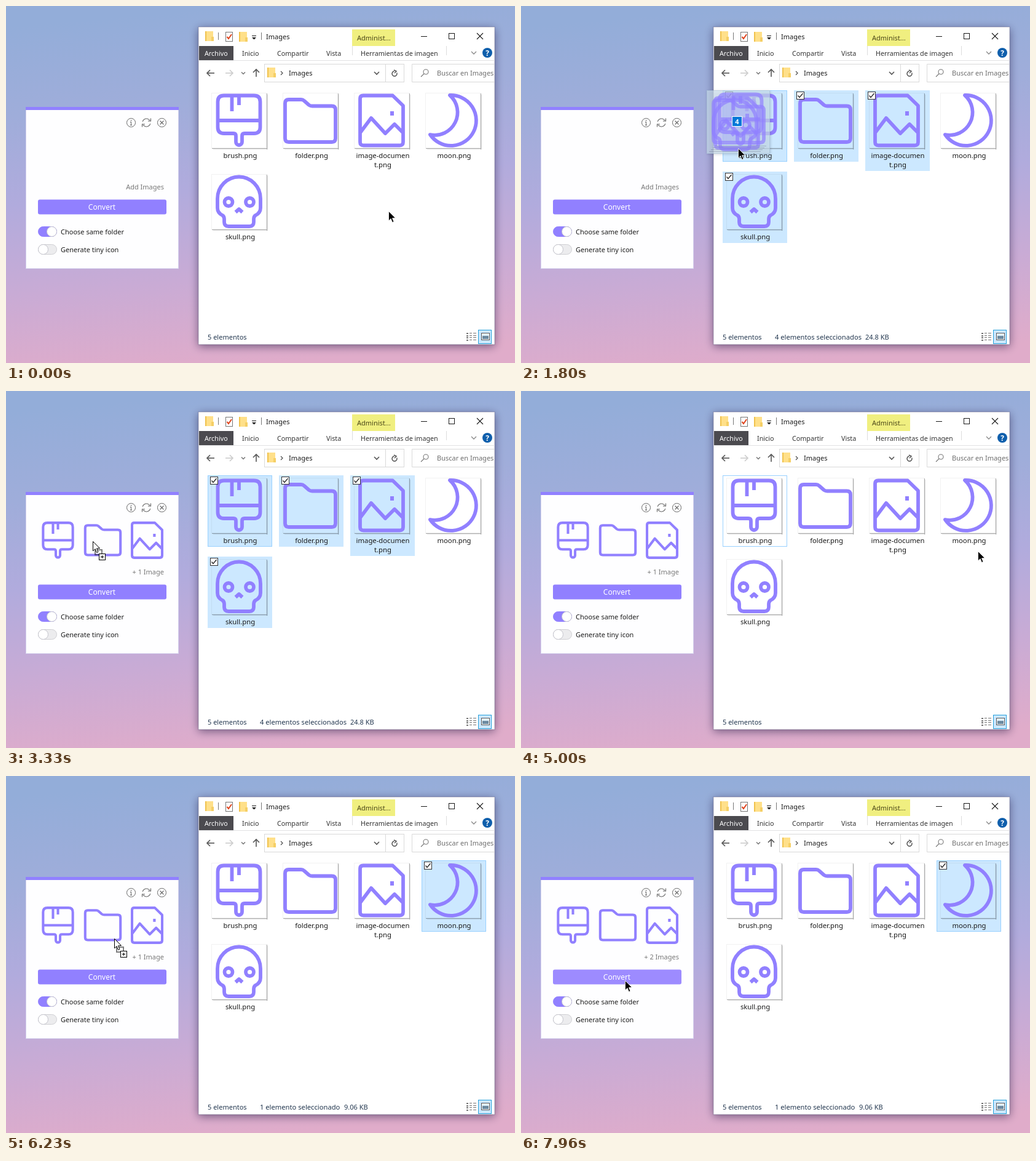
An HTML page with a canvas for the animation above (8000 ms loop, 828 px wide and 580 px high).

```html
<!DOCTYPE html>
<html lang="es">
<head>
<meta charset="utf-8">
<title>Drag and convert</title>
<style>
html, body { margin: 0; width: 100%; height: 100%; overflow: hidden; }
canvas { display: block; }
</style>
</head>
<body>
<canvas id="stage" width="828" height="580"></canvas>
<script>
const ctx = document.getElementById('stage').getContext('2d');
const LOOP = 8000;
const PURPLE = '#9180ff', PALE = '#cce8ff', EDGE = '#99d1ff', INK = '#1b1b1b';
const FONT = '"Noto Sans", "Open Sans", sans-serif';
const START = { x: 622, y: 333 };
const PANEL_RIGHT = 281;

// Pointer keys: time, x, y
const KEYS = [
  [0, 622, 333], [500, 622, 333], [830, 428, 230], [1060, 400, 212],
  [1230, 400, 212], [1360, 399, 217], [1600, 399, 217], [1800, 353, 231],
  [2100, 230, 245], [2430, 122, 246], [2550, 117, 237], [2700, 140, 227],
  [2860, 175, 245], [2980, 165, 261], [3100, 141, 244], [3670, 141, 244],
  [4160, 545, 326], [4770, 545, 326], [5000, 743, 260], [5200, 757, 205],
  [5370, 757, 205], [6200, 183, 264], [6230, 176, 264], [6830, 176, 264],
  [7250, 158, 304], [7660, 132, 339], [7960, 169, 332], [8000, 169, 332]
];

// Icon outlines on a 90 x 90 tile
const ICONS = {
  brush: 'M20.5 4.5H69.5Q79.5 4.5 79.5 14.5V56Q79.5 66 69.5 66H54Q50 66 50 70V80A5 5 0 0 1 40 80V70Q40 66 36 66H20.5Q10.5 66 10.5 56V14.5Q10.5 4.5 20.5 4.5ZM10.5 45H79.5M33.5 5V30M45 5V20',
  folder: 'M10 11H30Q33 11 35 13L43 20Q45 21.500 48 21.500H80Q86 21.500 86 27.500V74Q86 80 80 80H10Q4 80 4 74V17Q4 11 10 11Z',
  image: 'M15 4.5H63L80 21V80Q80 85.500 74.500 85.500H15.500Q10 85.500 10 80V9.500Q10 4.500 15 4.500ZM10 65L28 41L51 66L66 51L80 65',
  moon: 'M40 4A41 41 0 1 1 8 68A37 37 0 0 0 40 4Z',
  skull: 'M10 40A35 35.500 0 0 1 80 40V55Q80 63 72 67Q69 69 69 73V78Q69 85 62 85H28Q21 85 21 78V73Q21 69 18 67Q10 63 10 55ZM39.500 62L45 57L50.500 62M34.500 45.500A6.500 6.500 0 1 1 21.500 45.500A6.500 6.500 0 1 1 34.500 45.500M69 45.500A6.500 6.500 0 1 1 56 45.500A6.500 6.500 0 1 1 69 45.500'
};
for (const name in ICONS) ICONS[name] = new Path2D(ICONS[name]);

const FILES = [
  { icon: 'brush', label: ['brush.png'], x: 328, y: 137, h: 116 },
  { icon: 'folder', label: ['folder.png'], x: 444, y: 137, h: 116 },
  { icon: 'image', label: ['image-documen', 't.png'], x: 560, y: 137, h: 131 },
  { icon: 'moon', label: ['moon.png'], x: 676, y: 137, h: 116 },
  { icon: 'skull', label: ['skull.png'], x: 328, y: 269, h: 116 }
];
const CELL = 105;

function pointerAt(t) {
  let i = 0;
  while (i < KEYS.length - 2 && KEYS[i + 1][0] <= t) i++;
  const a = KEYS[i], b = KEYS[i + 1], span = b[0] - a[0], u = (t - a[0]) / span;
  const held = (p, q) => p[1] === q[1] && p[2] === q[2];
  const slope = (j, k) => {
    const p = KEYS[j - 1], c = KEYS[j], n = KEYS[j + 1];
    if (!p || !n || held(p, c) || held(c, n)) return 0;
    return (n[k] - p[k]) / (n[0] - p[0]);
  };
  const mix = k => {
    const u2 = u * u, u3 = u2 * u;
    return (2 * u3 - 3 * u2 + 1) * a[k] + (3 * u2 - 2 * u3) * b[k] +
      span * ((u3 - 2 * u2 + u) * slope(i, k) + (u3 - u2) * slope(i + 1, k));
  };
  return { x: Math.round(mix(1)), y: Math.round(mix(2)) };
}

function text(str, x, y, color = INK, size = 11, align = 'left', weight = '') {
  ctx.font = `${weight} ${size}px ${FONT}`;
  ctx.textAlign = align;
  ctx.fillStyle = color;
  ctx.fillText(str, x, y);
}

function rect(x, y, w, h, fill, edge) {
  if (fill) { ctx.fillStyle = fill; ctx.fillRect(x, y, w, h); }
  if (edge) { ctx.strokeStyle = edge; ctx.lineWidth = 1; ctx.strokeRect(x + .5, y + .5, w - 1, h - 1); }
}

function pill(x, y, w, h, r, fill, edge) {
  ctx.beginPath();
  ctx.roundRect(x, y, w, h, r);
  ctx.fillStyle = fill;
  ctx.fill();
  if (edge) { ctx.strokeStyle = edge; ctx.lineWidth = 1; ctx.stroke(); }
}

function line(color, width, ...pts) {
  ctx.beginPath();
  for (let i = 0; i < pts.length; i += 2) ctx.lineTo(pts[i], pts[i + 1]);
  ctx.strokeStyle = color;
  ctx.lineWidth = width;
  ctx.stroke();
}

function ring(x, y, r, color, width = 1, from = 0, to = Math.PI * 2) {
  ctx.beginPath();
  ctx.arc(x, y, r, from, to);
  ctx.strokeStyle = color;
  ctx.lineWidth = width;
  ctx.stroke();
}

function icon(name, x, y, scale = 1) {
  ctx.save();
  ctx.translate(x, y);
  ctx.scale(scale, scale);
  ctx.strokeStyle = ctx.fillStyle = PURPLE;
  ctx.lineWidth = 5.8;
  ctx.lineJoin = 'round';
  ctx.stroke(ICONS[name]);
  if (name === 'image') ctx.fillRect(59, 30, 6, 7);
  ctx.restore();
}

function backdrop() {
  const g = ctx.createLinearGradient(390, 0, 440, 580);
  ['#93add9', '#9fadda', '#b1abdd', '#c9abd5', '#e0acca'].forEach((c, i) => g.addColorStop(i / 4, c));
  ctx.fillStyle = g;
  ctx.fillRect(0, 0, 828, 580);
}

function folderGlyph(x, y) {
  rect(x, y, 13, 16, '#ffe08a');
  rect(x, y, 2, 16, '#f0c24e');
  rect(x + 10, y + 9, 4, 7, '#f5cf66');
}

function chevron(x, y, r, color, width = 1.3) {
  line(color, width, x - r, y - r / 2, x, y + r / 2, x + r, y - r / 2);
}

function arrow(x, y, dx, dy, color) {
  line(color, 1.6, x - dx * 6, y - dy * 6, x + dx * 6, y + dy * 6);
  line(color, 1.6, x + dx * 1 + dy * 5, y + dy * 1 + dx * 5, x + dx * 6, y + dy * 6,
    x + dx * 1 - dy * 5, y + dy * 1 - dx * 5);
}

function explorer() {
  ctx.save();
  ctx.shadowColor = 'rgba(30,20,60,.55)';
  ctx.shadowBlur = 14;
  ctx.shadowOffsetY = 3;
  rect(313, 34, 482, 516, '#fff');
  ctx.restore();
  rect(312.5, 33.5, 483, 517, null, 'rgba(90,85,120,.45)');

  folderGlyph(324, 41);
  rect(345, 43, 1, 12, '#777');
  rect(357, 42, 12, 16, '#fff', '#777');
  line('#e0451f', 2, 359.5, 50, 362, 53, 367, 46);
  folderGlyph(379, 42);
  rect(400, 48, 7, 1, INK);
  ctx.beginPath();
  ctx.moveTo(400, 51); ctx.lineTo(407, 51); ctx.lineTo(403.5, 54.5);
  ctx.fillStyle = INK;
  ctx.fill();
  rect(415, 43, 1, 12, '#777');
  text('Images', 423, 54);
  rect(563, 38, 70, 27, '#f0ef80');
  text('Administ...', 571, 56, '#4b4718');
  rect(675, 49, 10, 1, INK);
  rect(720, 44, 10, 10, null, INK);
  line(INK, 1.1, 766, 44, 776, 54);
  line(INK, 1.1, 776, 44, 766, 54);

  rect(314, 65, 56, 23, '#4b4a4f');
  [['Archivo', 323, '#fff'], ['Inicio', 384], ['Compartir', 441], ['Vista', 521],
    ['Herramientas de imagen', 577]].forEach(([s, x, c]) => text(s, x, 81, c || '#333', 10.75));
  rect(563, 65, 1, 15, '#ddd');
  rect(716, 65, 1, 15, '#ddd');
  rect(313, 88, 482, 1, '#e2e2e4');
  chevron(761, 76, 4, '#888');
  pill(775, 68, 16, 16, 8, '#0f5fac');
  text('?', 783, 80.5, '#fff', 12, 'center', 'bold');

  arrow(333, 109, -1, 0, '#555');
  arrow(363, 109, 1, 0, '#ccc');
  chevron(386, 109, 3, '#777', 1.5);
  arrow(407, 109, 0, -1, '#555');
  rect(420, 94, 228, 30, '#fff', '#d9d9d9');
  rect(617, 94, 1, 30, '#d9d9d9');
  folderGlyph(425, 100);
  line('#555', 1.3, 447, 106, 450, 109, 447, 112);
  text('Images', 460, 113);
  chevron(603, 109, 4, '#555', 1.6);
  ring(632, 110, 4, '#555', 1.5, -.4, 4.6);
  line('#555', 1.5, 631, 104, 635, 106, 632, 109);
  line('#d9d9d9', 1, 795, 94.5, 660.5, 94.5, 660.5, 123.5, 795, 123.5);
  ring(683, 107, 4, '#777', 1.1);
  line('#777', 1.1, 680, 110, 675, 115);
  text('Buscar en Images', 701, 113, '#6d6d6d');

  for (let i = 0; i < 4; i++) {
    const y = 531 + i * 4 - (i > 1 ? 1 : 0);
    rect(749, y, 3, 2, '#777');
    rect(754, y, 4, 1, '#777');
    rect(760, y, 5, 1, '#777');
  }
  rect(768, 526, 22, 23, PALE, '#26a0da');
  rect(773, 531, 14, 12, '#fff', '#555');
  rect(775, 536, 10, 5, '#6b8aa0');
  rect(775, 533, 10, 3, '#d8ecf8');
}

function checkbox(x, y, on) {
  rect(x, y, 13, 13, '#fff', '#333');
  if (on) line('#222', 1.3, x + 2.5, y + 6.5, x + 5, y + 9.5, x + 10.5, y + 3);
}

function file(f, selected, hover, focused) {
  if (selected) rect(f.x, f.y, CELL, f.h, PALE);
  else if (hover) rect(f.x, f.y, CELL, f.h, '#e5f3ff');
  if (focused || (selected && hover)) rect(f.x, f.y, CELL, f.h, null, EDGE);
  const x = f.x + 6, y = f.y + 4;
  rect(x, y, 90, 90, null, 'rgba(0,0,0,.05)');
  rect(x + 90, y + 1, 1, 91, 'rgba(0,0,0,.32)');
  rect(x + 91, y + 3, 1, 89, 'rgba(0,0,0,.1)');
  rect(x + 1, y + 90, 89, 1, 'rgba(0,0,0,.32)');
  rect(x + 3, y + 91, 88, 1, 'rgba(0,0,0,.1)');
  icon(f.icon, x, y);
  f.label.forEach((s, i) => text(s, f.x + 53, f.y + 110 + i * 15, INK, 11.3, 'center'));
  if (selected || hover) checkbox(f.x + 4, f.y + 2, selected);
}

function status(t, count) {
  text('5 elementos', 328, 542, '#23374f');
  if (!count) return;
  const many = t >= 1040 && t < 4630;
  const size = t >= 5400 ? '9.06 KB' : many ? '24.8 KB' : '6.04 KB';
  text(many ? '4 elementos seleccionados' : '1 elemento seleccionado', 413, 542, '#23374f', 11.2);
  text(size, many ? 560 : 550, 542, '#23374f');
}

function toggle(y, on) {
  pill(52.5, y, 30, 16, 8, on ? PURPLE : '#ececee', on ? PURPLE : '#d0d0d4');
  pill(on ? 66.5 : 52.5, y, 16, 16, 8, '#fff', '#c4c4cc');
}

function panel(t, p) {
  rect(32, 164, 249, 263, '#fefeff', '#d5d2ee');
  rect(32, 164, 249, 5, PURPLE);
  const grey = '#666';
  ring(203.5, 189.5, 7, grey);
  rect(203, 188, 1, 5, grey);
  rect(202, 188, 1, 1, grey);
  rect(202, 193, 3, 1, grey);
  rect(203, 185, 1, 2, grey);
  ring(228.5, 189.5, 6.5, grey, 1.1, -2.9, -.5);
  ring(228.5, 189.5, 6.5, grey, 1.1, .25, 2.6);
  line(grey, 1.1, 235.5, 182.5, 235.5, 187, 231, 187);
  line(grey, 1.1, 221.5, 196.5, 221.5, 192, 226, 192);
  ring(253.5, 189.5, 7, grey);
  line(grey, 1.1, 250.5, 186.5, 256.5, 192.5);
  line(grey, 1.1, 256.5, 186.5, 250.5, 192.5);

  if (t >= 3330) {
    icon('brush', 53, 211, .7);
    icon('folder', 126, 210.5, .7);
    icon('image', 198, 211, .7);
  }
  const note = t < 3330 ? 'Add Images' : t < 6560 ? '+ 1 Image' : '+ 2 Images';
  text(note, 257, 298, '#777', 11, 'right');

  const hot = t >= 6860 && p.x > 52 && p.x < 261 && p.y >= 314 && p.y < 339;
  pill(52, 314.5, 209, 24, 3, hot ? '#9d8bff' : PURPLE);
  text('Convert', 156, 331, '#fff', 12, 'center');
  toggle(358.5, true);
  toggle(387.5, false);
  text('Choose same folder', 89, 371);
  text('Generate tiny icon', 89, 400);
}

function dragImage(p, names) {
  const x = p.x - 51, y = p.y - 94;
  ctx.save();
  ctx.shadowColor = 'rgba(40,50,80,.35)';
  ctx.shadowBlur = 4;
  ctx.shadowOffsetX = ctx.shadowOffsetY = 1;
  rect(x, y, 103, 103, 'rgba(212,232,246,.62)');
  ctx.restore();
  rect(x, y, 103, 103, null, 'rgba(150,175,195,.45)');
  const stack = names.length > 1;
  ctx.globalAlpha = .7;
  names.forEach((name, i) => {
    const off = stack ? i * 3 : 3;
    if (stack) rect(x + 4 + off, y + 99 - off, 84, 1, 'rgba(90,100,120,.5)');
    icon(name, x + 1 + off, y + (stack ? 11 - off : 6));
  });
  if (stack) pill(x + 10, y + 13, 72, 70, 10, 'rgba(145,128,255,.4)');
  ctx.globalAlpha = 1;
  if (stack) {
    rect(x + 41, y + 42, 17, 17, '#0078d7', '#fff');
    text(String(names.length), x + 49.5, y + 55, '#fff', 11, 'center', 'bold');
  }
}

function pointer(p, copy) {
  ctx.save();
  ctx.translate(p.x, p.y);
  if (copy) {
    ctx.setLineDash([1, 1]);
    rect(3, 13, 13, 10, null, '#000');
    rect(4, 14, 11, 8, null, '#000');
    ctx.setLineDash([]);
  }
  ctx.beginPath();
  [[.5, .5], [.5, 16], [4, 12.5], [6.5, 18.5], [9, 17.5], [6.500, 11.800], [11.500, 11.500]]
    .forEach(([x, y]) => ctx.lineTo(x, y));
  ctx.closePath();
  ctx.fillStyle = copy ? '#fff' : '#000';
  ctx.fill();
  ctx.strokeStyle = copy ? '#000' : '#fff';
  ctx.lineWidth = copy ? 1 : .8;
  ctx.stroke();
  if (copy) {
    rect(10, 20, 11, 11, '#fff', '#000');
    rect(13, 25, 5, 1, '#000');
    rect(15, 23, 1, 5, '#000');
  }
  ctx.restore();
}

function draw(t) {
  const p = pointerAt(t);
  const selecting = t >= 500 && t < 1260;
  const firstDrag = t >= 1630 && t < 3700, lastDrag = t >= 5400 && t < 6860;
  const dragging = firstDrag || lastDrag;
  const inside = f => p.x >= f.x && p.x < f.x + CELL && p.y >= f.y && p.y < f.y + f.h;
  const isSelected = f => {
    if (t >= 5400) return f.icon === 'moon';
    if (t < 500 || t >= 4630) return false;
    if (!selecting) return f.icon !== 'moon';
    return p.x < f.x + CELL && START.x > f.x && p.y < f.y + f.h && START.y > f.y;
  };

  backdrop();
  explorer();
  const chosen = FILES.filter(isSelected);
  for (const f of FILES) {
    const on = chosen.includes(f);
    const focused = f.icon === 'brush' ? on || (t >= 4630 && t < 5400) : f.icon === 'moon' && on;
    file(f, on, !selecting && !dragging && inside(f), focused);
  }
  status(t, chosen.length);
  panel(t, p);

  if (selecting && p.x < START.x) {
    rect(p.x, p.y, START.x - p.x, START.y - p.y, 'rgba(0,102,204,.33)', '#0078d7');
  }
  const overPanel = p.x < PANEL_RIGHT;
  if (dragging && !overPanel) dragImage(p, firstDrag ? ['skull', 'image', 'folder', 'brush'] : ['moon']);
  pointer(p, dragging && overPanel);
}

function tick() {
  draw(performance.now() % LOOP);
  requestAnimationFrame(tick);
}
tick();
</script>
</body>
</html>
```
